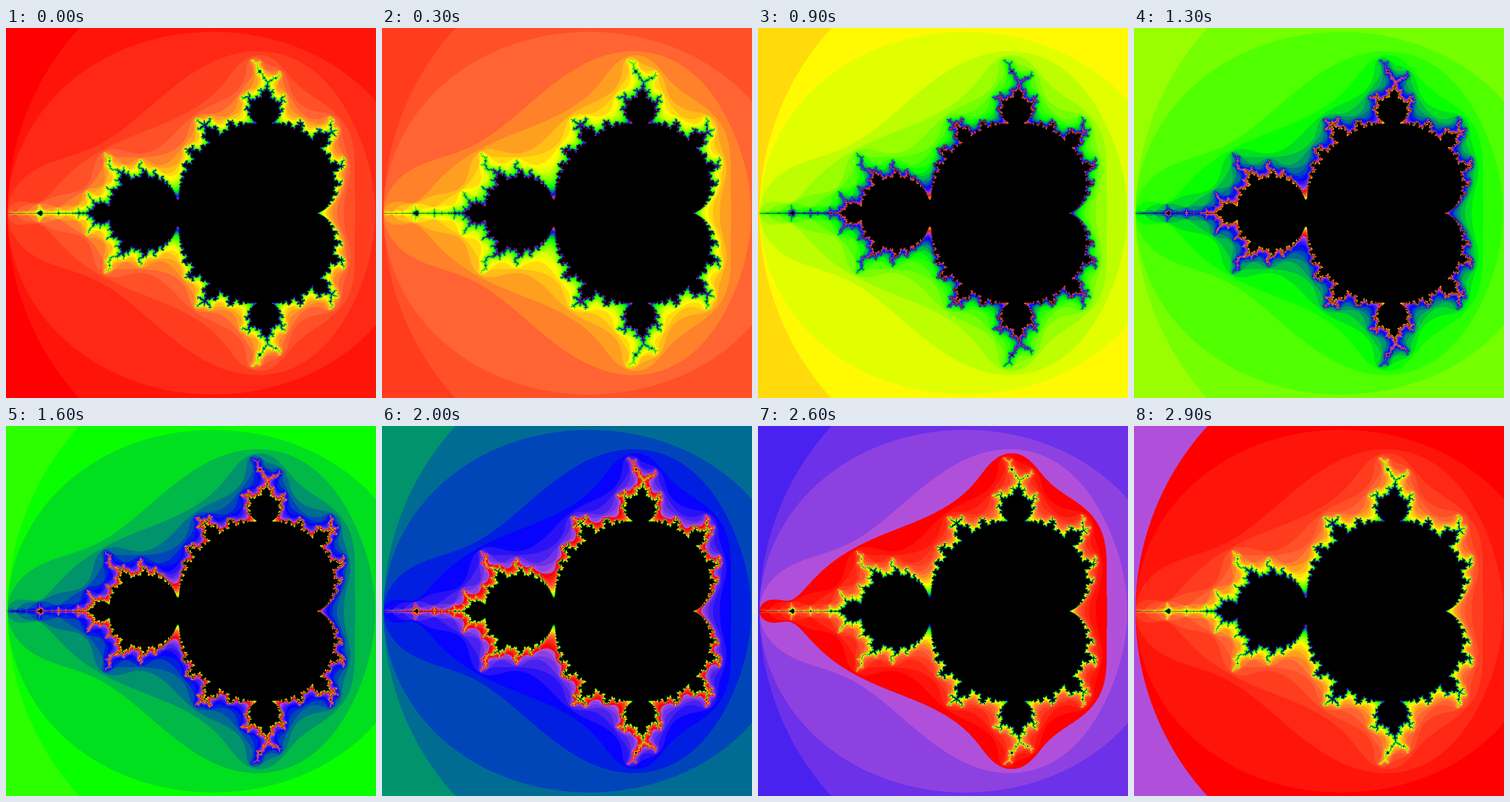
Recreate the animation shown at these times as an HTML page with a canvas. Size 540 by 540 pixels, loop 3000 ms.

```html
<!DOCTYPE html>
<html lang="en">
<head>
<meta charset="utf-8">
<title>Mandelbrot colour cycle</title>
<style>
  html, body { margin: 0; overflow: hidden; background: #000; }
  canvas { display: block; }
</style>
</head>
<body>
<canvas id="stage" width="540" height="540"></canvas>
<script>
const SIZE = 540;
const FINE = SIZE * 2;        // computed at double size, then averaged down
const SCALE = 400;            // fine pixels per unit of the complex plane
const ORIGIN = [804, 540];    // fine pixel where c = 0
const STEPS = 30;             // iteration limit and palette length
const STEP_MS = 100;
const BLACK = 0xff000000;

// [palette position, red, green, blue]; the jump from the last stop to the first is hard
const STOPS = [
  [0, 255, 0, 0],
  [5.1, 255, 102, 51],
  [10.2, 255, 255, 0],
  [17.2, 0, 255, 0],
  [23.8, 0, 0, 255],
  [29, 176, 80, 218],
];

function paletteColor(index) {
  const next = Math.max(1, STOPS.findIndex(stop => stop[0] >= index));
  const a = STOPS[next - 1], b = STOPS[next];
  const k = (index - a[0]) / (b[0] - a[0]);
  const [red, green, blue] = [1, 2, 3].map(i => Math.round(a[i] + (b[i] - a[i]) * k));
  return (BLACK | blue << 16 | green << 8 | red) >>> 0;
}

function escapeTime(cx, cy) {
  let x = 0, y = 0;
  for (let n = 0; n < STEPS; n++) {
    const re = x * x - y * y + cx;
    y = 2 * x * y + cy;
    x = re;
    if (x * x + y * y > 4) return n;
  }
  return STEPS;
}

const palette = Array.from({ length: STEPS }, (_, i) => paletteColor(i));
const escapes = new Uint8Array(FINE * FINE).map((_, i) =>
  escapeTime((i % FINE - ORIGIN[0]) / SCALE, (Math.floor(i / FINE) - ORIGIN[1]) / SCALE));

const fine = document.createElement("canvas");
fine.width = fine.height = FINE;
const fineCtx = fine.getContext("2d");
const picture = fineCtx.createImageData(FINE, FINE);
const pixels = new Uint32Array(picture.data.buffer);
const ctx = document.getElementById("stage").getContext("2d");
let shown = -1;

function draw() {
  const shift = Math.floor(performance.now() / STEP_MS) % STEPS;
  if (shift !== shown) {
    shown = shift;
    escapes.forEach((n, i) => {
      pixels[i] = n === STEPS ? BLACK : palette[(n + shift) % STEPS];
    });
    fineCtx.putImageData(picture, 0, 0);
    ctx.drawImage(fine, 0, 0, SIZE, SIZE);
  }
  requestAnimationFrame(draw);
}
draw();
</script>
</body>
</html>
```
